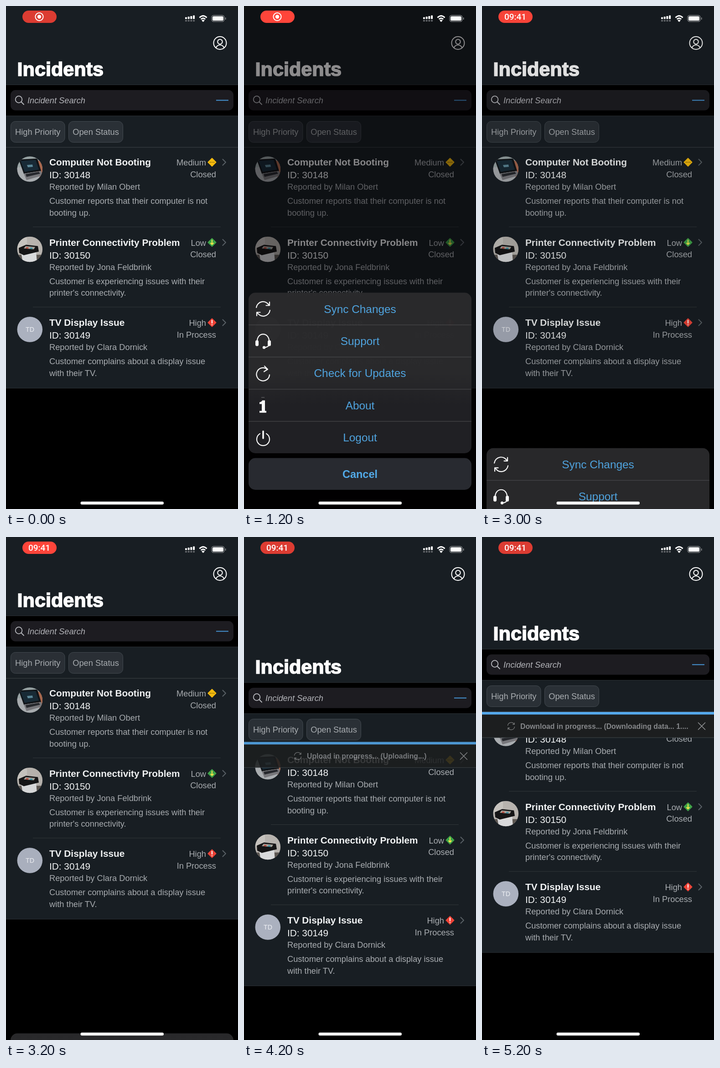
Animation, 509 px wide and 1101 px high, one loop 5400 ms. Source, as an HTML page:

```html
<!DOCTYPE html>
<html lang="en">
<head>
<meta charset="utf-8">
<title>Incident list</title>
<style>
  html, body { margin: 0; width: 100%; height: 100%; overflow: hidden; background: #000; }
  svg { display: block; width: 100%; height: 100%; }
  text { font: 18.27px "Liberation Sans", Arial, sans-serif; fill: #a9adb1; }
  .heading { font-weight: bold; font-size: 43.2px; fill: #fff; stroke: #fff; stroke-width: 1.7; }
  .title { font-weight: bold; font-size: 20.8px; fill: #f2f4f5; }
  .id { font-size: 20.8px; fill: #f2f4f5; }
  .search { font-style: italic; fill: #b4b5ba; }
  .initials { font-size: 14.3px; fill: #eef0f4; }
  .menu { font-size: 24.4px; fill: #52a9e6; }
  .cancel { font-size: 23.5px; font-weight: bold; fill: #55b0f0; }
  .banner { font-size: 15.8px; font-weight: bold; fill: #85878a; }
  .clock { font: 500 19px Roboto, sans-serif; fill: #fff; }
  .end { text-anchor: end; }
  .mid { text-anchor: middle; }
  .line { fill: none; stroke: #fff; stroke-width: 2.2; stroke-linecap: round; stroke-linejoin: round; }
</style>
</head>
<body>
<svg id="stage" viewBox="0 0 509 1101" preserveAspectRatio="none"></svg>
<script>
const LOOP = 5400, STEP = 200;
const stage = document.getElementById('stage');

// Markup helpers
const text = (x, y, cls, value) => `<text x="${x}" y="${y}" class="${cls}">${value}</text>`;
const rect = (x, y, w, h, fill, r = 0, extra = '') =>
  `<rect x="${x}" y="${y}" width="${w}" height="${h}" rx="${r}" fill="${fill}" ${extra}/>`;
const circle = (x, y, r, fill, extra = '') => `<circle cx="${x}" cy="${y}" r="${r}" fill="${fill}" ${extra}/>`;
const shape = (d, fill) => `<path d="${d}" fill="${fill}"/>`;
const line = (d, extra = '') => `<path class="line" d="${d}" ${extra}/>`;
const group = (id, body) => `<g id="${id}">${body}</g>`;
const at = (x, y, body) => `<g transform="translate(${x} ${y})">${body}</g>`;
const style = (color, width) => `style="stroke:${color};stroke-width:${width}"`;

const laptop = `<g clip-path="url(#disc)">${
  rect(24, 329, 56, 28, '#98a3a4') + rect(24, 353, 56, 33, '#a9adb0') +
  shape('M60 334L80 342V380L66 366Z', '#a8674d') +
  shape('M28 336L66 334Q69 334 70 338L77 361L39 367Z', '#101418') +
  shape('M32 339L65 337L72 358L41 363Z', '#182a36') +
  shape('M46 348L58 347L59 352L48 353Z', '#5b8797') +
  shape('M39 367L77 361L80 371L45 381Z', '#77777b') +
  shape('M43 368L72 363L75 367L45 374Z', '#26282d')}</g>`;

const printer = `<g clip-path="url(#disc)">${
  rect(24, 329, 56, 56, '#b7b3ae') + rect(24, 329, 22, 26, '#c6c3be') +
  rect(24, 369, 56, 16, '#5d5752') +
  shape('M33 364L66 362L68 386H37Z', '#d9dadb') +
  shape('M28 354L44 347L70 350L72 362L39 370L29 365Z', '#151516') +
  shape('M43 350L64 352L61 357L39 355Z', '#a9a49c') +
  shape('M45 352L50 353L48 356L43 355Z', '#b84b3e') +
  shape('M54 353L59 354L57 357L52 356Z', '#3f8fa0')}</g>`;

const initials = circle(52.3, 357, 27.8, '#abb1bf') + text(52.5, 362, 'initials mid', 'TD');

const dots = [-4, 0, 4].map(x => circle(452 + x, 342, 1.1, '#6b5410')).join('');
const downArrow = line('M452 337V346M449 343.5L452 346.5L455 343.5', style('#f6e64a', 2));
const bang = line('M452 337V343M452 346.6V346.8', style('#fff', 2.2));

const rows = [
  { title: 'Computer Not Booting', id: 30148, person: 'Milan Obert', level: 'Medium', status: 'Closed',
    notes: ['Customer reports that their computer is not', 'booting up.'],
    color: '#f6bb0e', mark: dots, avatar: laptop },
  { title: 'Printer Connectivity Problem', id: 30150, person: 'Jona Feldbrink', level: 'Low', status: 'Closed',
    notes: ['Customer is experiencing issues with their', "printer's connectivity."],
    color: '#3fa349', mark: downArrow, avatar: printer },
  { title: 'TV Display Issue', id: 30149, person: 'Clara Dornick', level: 'High', status: 'In Process',
    notes: ['Customer complains about a display issue', 'with their TV.'],
    color: '#ee4337', mark: bang, avatar: initials }
];

const drawRow = (r, i) => at(0, i * 175.5,
  r.avatar +
  text(95, 349, 'title', r.title) +
  text(95, 377, 'id', 'ID: ' + r.id) +
  text(95, 402, '', 'Reported by ' + r.person) +
  r.notes.map((note, k) => text(95, 433 + k * 25.5, '', note)).join('') +
  text(439, 349, 'end', r.level) + text(461, 374.5, 'end', r.status) +
  `<path d="M452 333.5L460.5 342L452 350.5L443.5 342Z" fill="${r.color}" stroke="${r.color}" stroke-width="2" stroke-linejoin="round"/>` +
  r.mark +
  line('M475.5 335.5L482 342L475.5 348.5', style('#596066', 2)) +
  (i < 2 ? rect(59, 483, 412, 1, '#30363a') : ''));

const chip = (x, w, label) =>
  rect(x + .5, 252.5, w - 1, 46, '#2a3036', 10, 'stroke="#434a50"') + text(x + w / 2, 282, 'mid', label);

const page =
  rect(0, -300, 509, 472, '#181e23') + rect(0, 172, 509, 1, '#2b3035') +
  text(24.5, 152.5, 'heading', 'Incidents') +
  rect(10, 184, 489, 44.5, '#1d1c21', 11) +
  circle(28, 204.5, 7.3, 'none', 'stroke="#b9babf" stroke-width="1.8"') +
  line('M33.5 210L39 215.5', style('#b9babf', 1.9)) +
  text(47, 213, 'search', 'Incident Search') +
  rect(461, 205.5, 27, 1.8, '#4aa0e6') +
  rect(0, 240, 509, 597, '#181e23') + rect(0, 240, 509, 1, '#2b3035') +
  chip(10, 119.5, 'High Priority') + chip(137, 120, 'Open Status') +
  rect(0, 308.7, 509, 1.3, '#353b40') +
  rows.map(drawRow).join('') +
  rect(0, 836, 509, 1, '#2b3035');

const profile =
  circle(469.5, 81, 14, 'none', 'stroke="#fff" stroke-width="2"') +
  circle(469.5, 78.2, 5.2, 'none', 'stroke="#fff" stroke-width="2"') +
  line('M460.8 91.5A9 8.5 0 0 1 478.2 91.5', style('#fff', 2));

const spinner = Array.from({ length: 8 }, (_, i) =>
  `<path class="line" d="M0 -10V-16" transform="rotate(${i * 45})" ${style('#7d8286', 4.6)}/>`).join('');

const syncIcon = line('M-15 -3A15 15 0 0 1 13 -8M14 -15V-7.5H6.5M15 3A15 15 0 0 1 -13 8M-14 15V7.5H-6.5');

const banner =
  rect(0, 0, 509, 56, '#1c1e1f') + rect(0, 0, 509, 5.6, '#55a9ec') + rect(0, 55.5, 509, 1.2, '#3b4044') +
  group('message', `<g transform="translate(8 31) scale(.5)" opacity=".5">${syncIcon}</g>` +
    '<text id="progress" class="banner" x="28" y="36.5"></text>') +
  line('M474.5 23.5L489.5 38.5M489.5 23.5L474.5 38.5', style('#8d8f91', 1.7));

const icons = [
  syncIcon,
  line('M-13 3C-15 -21 15 -21 13 3M13 7Q12 13 4 14') +
    rect(-17, -2, 7, 13, '#fff', 3.5) + rect(10, -2, 7, 13, '#fff', 3.5) + circle(2, 14, 3.2, '#fff'),
  line('M9 -10A14.3 14.3 0 1 0 14 2M3 -17L10 -10L2 -5'),
  shape('M-8 -7Q-3 -8 -2 -11H4V12H7V16H-8V12H-3V-3H-8Z', '#fff') + rect(-4, -18, 7, 1, '#77777a'),
  line('M-7 -10A14 14 0 1 0 7 -10') + line('M0 -15V0', style('#fff', 3.6))
];
const labels = ['Sync Changes', 'Support', 'Check for Updates', 'About', 'Logout'];
const sheet =
  rect(10, 627.5, 489, 351.5, 'url(#panel)', 15) +
  labels.map((label, i) => at(0, i * 70.4,
    (i ? rect(10, 627, 489, 1.2, '#4a4a4d') : '') +
    at(42, 663 + (i === 2 || i === 4 ? 1.5 : 0), icons[i]) +
    text(254.5, 671.5, 'menu mid', label))).join('') +
  rect(10, 989.5, 489, 69.5, '#2a2c32', 15) + text(254.5, 1033, 'cancel mid', 'Cancel');

const signal = [0, 1, 2, 3].map(i =>
  rect(393 + i * 5.7, 24.5 - i * 1.3, 4, 4 + i * 1.3, '#fff', 1) +
  rect(393 + i * 5.7, 30.5, 4, 3.6, '#64676b', 1)).join('');
const arcs = [['M424.5 25.5Q432.5 17.5 440.5 25.5', 3], ['M427.8 29Q432.5 24.4 437.2 29', 2.8]]
  .map(([d, w]) => `<path d="${d}" fill="none" stroke="#fff" stroke-width="${w}"/>`).join('');
const statusBar =
  rect(36, 10, 75, 27, '#dc3b31', 13.5, 'id="pill"') +
  group('record', circle(73, 23.5, 8.6, 'none', 'stroke="#fff" stroke-width="2"') + circle(73, 23.5, 4.2, '#fff')) +
  group('clock', text(73, 30, 'clock mid', '09:41')) +
  signal + arcs + shape('M429 31.5Q432.5 28.5 436 31.5L432.5 35Z', '#fff') +
  rect(451, 20.5, 28, 13.5, 'none', 4.5, 'stroke="#85888b" stroke-width="1.3"') +
  rect(453, 22.5, 24, 9.5, '#fff', 2.6) + rect(480.8, 25, 1.7, 5, '#85888b', 1) +
  rect(163.5, 1084.8, 182.5, 6.4, '#fff', 3.2);

stage.innerHTML = `<defs>
    <clipPath id="disc"><circle cx="52.3" cy="357" r="27.8"/></clipPath>
    <linearGradient id="panel" x2="0" y2="1">
      <stop offset=".5" stop-color="#2a2a2c"/><stop offset=".7" stop-color="#222226"/>
    </linearGradient>
  </defs>` +
  rect(0, 0, 509, 1101, '#000') + group('page', page) + group('banner', banner) + profile +
  group('spinner', spinner) + rect(0, 0, 509, 1101, '#030004', 0, 'id="dim"') +
  group('sheet', sheet) + statusBar;

const part = Object.fromEntries([...stage.querySelectorAll('[id]')].map(el => [el.id, el]));
const move = (el, x, y) => el.setAttribute('transform', `translate(${x} ${y})`);
const fade = (el, value) => el.setAttribute('opacity', value);

// Linear interpolation through [time, value] points
function track(t, points) {
  const next = points.findIndex(p => p[0] > t);
  if (next < 0) return points.at(-1)[1];
  if (next === 0) return points[0][1];
  const [t0, a] = points[next - 1], [t1, b] = points[next];
  return a + (b - a) * (t - t0) / (t1 - t0);
}
const easeOut = (t, start, duration) =>
  1 - (1 - Math.min(1, Math.max(0, (t - start) / duration))) ** 3;

const pulse = [[0, 0], [1200, 1], [2200, .35], [2600, .35], [3200, 1], [3800, 0], [4200, 0], [4700, 1], [5200, 0]];
const pull = [[3400, 0], [3600, 110], [3800, 181], [4000, 175], [4200, 146], [4400, 100], [4600, 77], [4800, 73]];

function render(t) {
  const open = easeOut(t, 400, 560) - easeOut(t, 2800, 579);
  move(part.sheet, 0, 473 * (1 - open));
  fade(part.sheet, open > 0 ? .97 : 0);
  fade(part.dim, .45 * open);

  const offset = track(t, pull);
  move(part.page, 0, offset);
  move(part.spinner, 254.5, 145);
  fade(part.spinner, track(t, [[3400, 0], [3800, 1], [4000, .6], [4200, 0]]));

  const downloading = t >= 4800;
  move(part.banner, 0, 310 + offset - track(t, [[4000, 40], [4200, 7.5], [4400, 0]]));
  fade(part.banner, track(t, [[4000, 0], [4200, .87], [4400, 1]]));
  move(part.message, downloading ? 56 : 110, 0);
  part.progress.textContent = downloading
    ? 'Download in progress... (Downloading data... 1....'
    : 'Upload in progress... (Uploading...)';

  const glow = track(t, pulse);
  part.pill.setAttribute('fill', `rgb(${220 + 35 * glow} ${60 + 9 * glow} ${50 + 8 * glow})`);
  // The recording symbol gives way to the clock and holds half way for a moment
  const swap = track(t, [[2000, 0], [2200, .6], [2400, .6], [2600, 1]]);
  fade(part.record, 1 - swap);
  fade(part.clock, Math.min(1, swap * 1.4));
}

function tick() {
  render(Math.floor(performance.now() % LOOP / STEP) * STEP);
  requestAnimationFrame(tick);
}
tick();
</script>
</body>
</html>
```
